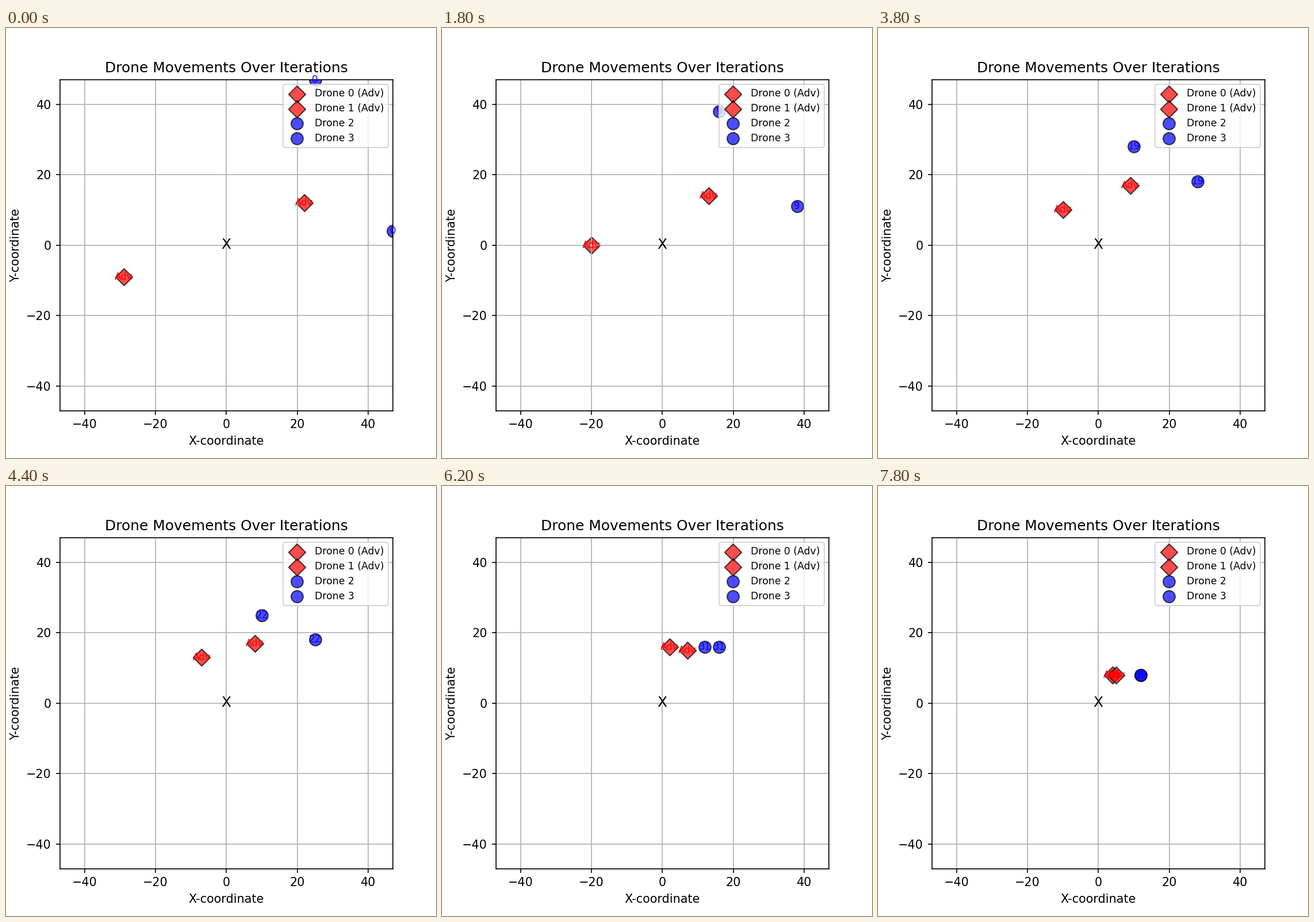
Animation of 748x748 px, one loop 8000 ms. Source, as a matplotlib script:

```python
import matplotlib.pyplot as plt
import numpy as np
from matplotlib.animation import FuncAnimation

plt.rcParams["font.family"] = "DejaVu Sans"

STEPS = 40
LIMIT = 47


def lowest(*limits):
    return np.minimum.reduce(np.broadcast_arrays(*limits))


def highest(*limits):
    return np.maximum.reduce(np.broadcast_arrays(*limits))


def grid_path(x, y):
    return np.rint(np.column_stack([x, y]))


# The drones gather, then descend together along the front.
t = np.arange(STEPS)
front = LIMIT - t
paths = [
    grid_path(lowest(t - 29, 4), lowest(t - 9, front)),
    grid_path(highest(22 - t, 11.48 - 0.155 * t),
              lowest(12.4 + 0.23 * t, 17, 42.5 - 0.88 * t)),
    grid_path(highest(25 - t, 10, lowest(t - 18, 12)), front),
    grid_path(highest(front, 12),
              lowest(highest(t + 2, 4), 20.5 - t / 8, front)),
]

fig, ax = plt.subplots(figsize=(5, 5), dpi=149.6)
ticks = range(-40, 41, 20)
ax.set(xlim=(-LIMIT, LIMIT), ylim=(-LIMIT, LIMIT), xticks=ticks, yticks=ticks,
       xlabel="X-coordinate", ylabel="Y-coordinate",
       title="Drone Movements Over Iterations")
ax.grid(True)
ax.text(-0.1, 0.12, "X", fontsize=12, ha="center", va="center")


def add_drone(i, start):
    adv = i < 2
    color, shape = ("red", "D") if adv else ("blue", "o")
    label = f"Drone {i}" + (" (Adv)" if adv else "")
    marker = ax.scatter(*start, s=100, marker=shape, color=color,
                        edgecolors="black", alpha=0.7, label=label)
    tag = ax.text(*start, "Adv" if adv else "0", color=color, fontsize=8,
                  ha="center", va="center")
    return marker, tag, adv


drones = [add_drone(i, path[0]) for i, path in enumerate(paths)]
ax.legend(loc="upper right", fontsize="small", labelspacing=0.45)


def update(step):
    for path, (marker, tag, adv) in zip(paths, drones):
        marker.set_offsets([path[step]])
        tag.set_position(path[step])
        if not adv:
            tag.set_text(str(step))


anim = FuncAnimation(fig, update, frames=STEPS, interval=200, repeat=True,
                     repeat_delay=0, blit=False)
plt.show()
```
